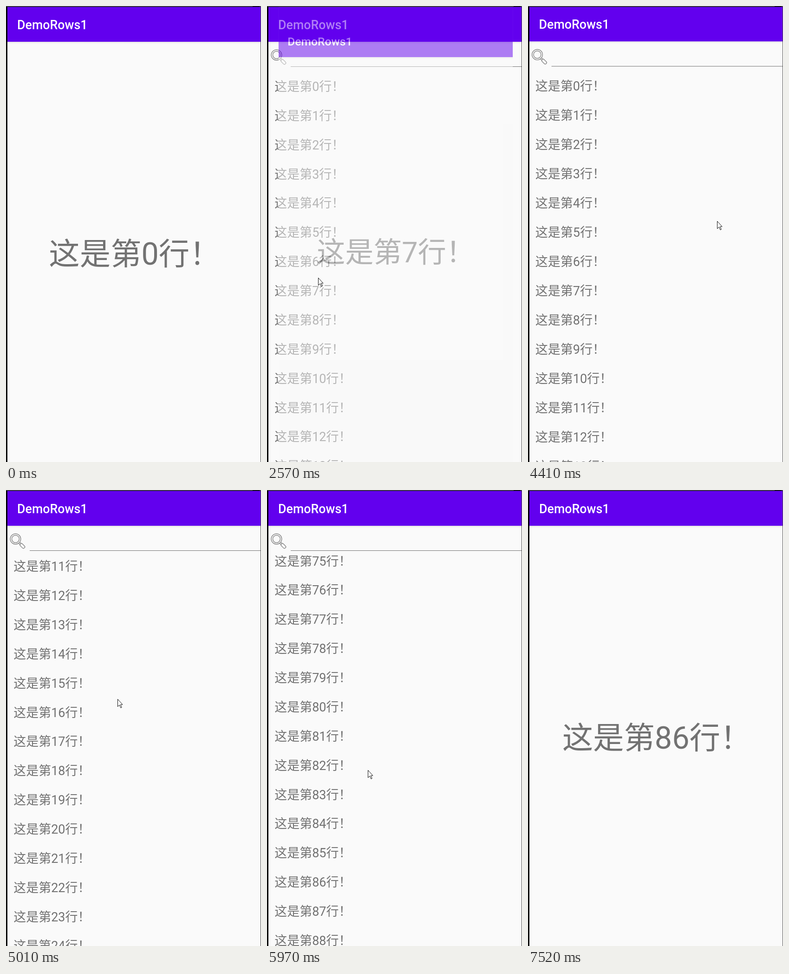
Write an HTML page that moves like this. It is 549 by 982 pixels and loops after 8000 ms.

```html
<!DOCTYPE html>
<html lang="zh-CN">
<head>
<meta charset="utf-8">
<title>List and detail</title>
<style>
  html, body { margin: 0; width: 100%; height: 100%; overflow: hidden; background: #000; }
  svg { display: block; width: 549px; height: 982px; }
  text { font-family: Roboto, "Noto Sans CJK SC", "Noto Sans CJK", sans-serif; fill: #727272; }
  .row { font-size: 27px; }
  .big { font-size: 66.4px; text-anchor: middle; }
  .title { font-size: 26.8px; font-weight: 500; fill: #fff; }
  .icon { fill: none; stroke: #858585; stroke-width: 1.4; }
</style>
</head>
<body>
<svg viewBox="0 0 549 982">
  <defs>
    <clipPath id="screen"><rect x="3" y="2" width="545" height="980"/></clipPath>
    <clipPath id="listBox"><rect x="3" y="141" width="560" height="870"/></clipPath>
    <linearGradient id="shade" x2="0" y2="1">
      <stop stop-color="#000" stop-opacity=".1"/>
      <stop offset="1" stop-color="#000" stop-opacity="0"/>
    </linearGradient>
    <g id="page">
      <rect x="3" y="-40" width="548" height="1070" fill="#fafafa"/>
      <rect x="3" y="77" width="548" height="4" fill="url(#shade)"/>
      <rect x="3" y="-40" width="548" height="117" fill="#6200ee"/>
      <text class="title" x="24" y="50">DemoRows1</text>
    </g>
  </defs>

  <g clip-path="url(#screen)">
    <g id="list">
      <use href="#page"/>
      <g class="icon" transform="translate(20.5 105.5) rotate(45)">
        <circle r="11.3"/>
        <circle r="8"/>
        <path d="M11.3 -1.700h3.700M11.3 1.700h3.700"/>
        <rect x="15" y="-3" width="12" height="6" rx="2.600"/>
      </g>
      <rect x="51" y="130" width="500" height="1" fill="#727272"/>
      <g clip-path="url(#listBox)"><g id="rows"></g></g>
    </g>
    <g id="detail">
      <use href="#page"/>
      <text id="big" class="big" x="277" y="557"></text>
    </g>
  </g>

  <rect width="549" height="1" fill="#777"/>
  <rect x="531" width="15" height="1" fill="#222"/>
  <rect x="548" y="1" width="1" height="981" fill="#555"/>
  <path id="pointer" d="M.5 .5v16l3.700-3.500 2.800 6.200 2.200-1.100-2.700-6h4.500z" fill="#fff" stroke="#111"/>
</svg>

<script>
const LOOP = 8000, STEP = 120, PITCH = 62.87;
const $ = id => document.getElementById(id);
const label = n => `这是第${n}行！`;
const clamp = v => Math.max(0, Math.min(1, v));

// The picture advances in steps during these spans and rests in between.
const spans = [[870, 2190], [2570, 3050], [4050, 6090], [6430, 6670], [7040, 7520]];

// Page changes: those with a row open its detail, the others go back to the list.
const moves = [
  { at: -480, len: 480, row: 0 },
  { at: 870, len: 360 },
  { at: 2570, len: 480, row: 7 },
  { at: 4050, len: 530 },
  { at: 7040, len: 480, row: 86 }
];

// Pointer path: step count, x, y.
const path = [
  [1, 560, 310], [4, 327, 352], [7, 113, 392], [13, 110, 585], [17, 560, 470],
  [18, 560, 430], [21, 407, 463], [24, 240, 720], [26, 240, 450], [29, 249, 723],
  [32, 329, 400], [34, 217, 603], [35, 217, 603], [39, 111, 584], [43, 560, 470]
];

// Snaps a time to the last step shown and counts the steps so far.
function snap(time) {
  let t = 0, count = 0;
  for (const [from, to] of spans) {
    if (time < from) break;
    const n = Math.floor((Math.min(time, to) - from) / STEP);
    t = from + n * STEP;
    count += n + 1;
  }
  return { t, count };
}

function pointerAt(step) {
  const i = path.findIndex(p => p[0] >= step);
  if (i < 1) return path[0].slice(1);
  const [s0, x0, y0] = path[i - 1], [s1, x1, y1] = path[i];
  const f = (step - s0) / (s1 - s0);
  return [x0 + (x1 - x0) * f, y0 + (y1 - y0) * f].map(Math.round);
}

// A flick runs a distance and slows to a stop.
const flick = (t, start, dist) => dist * (1 - (1 - clamp((t - start) / 693)) ** 1.5);
const scrollAt = t => flick(t, 4800, 1675) + flick(t, 5400, 3308);

function zoom(el, s) {
  el.setAttribute("transform", `translate(277 490) scale(${s}) translate(-277 -490)`);
}

for (let n = 0; n < 100; n++) {
  const row = document.createElementNS("http://www.w3.org/2000/svg", "text");
  row.setAttribute("class", "row");
  row.setAttribute("x", 16.2);
  row.setAttribute("y", 183 + n * PITCH);
  row.textContent = label(n);
  $("rows").append(row);
}

function draw(time) {
  const { t, count } = snap(time);
  const past = moves.filter(m => m.at <= t);
  const move = past[past.length - 1];
  const opening = "row" in move;
  const age = t - move.at, rest = 1 - clamp(age / move.len);

  zoom($("list"), 1 + .018 * (opening ? 1 - rest : rest ** 2));
  zoom($("detail"), opening ? 1 - .08 * rest ** 3 : .97);
  $("detail").setAttribute("opacity", opening ? clamp(.5 + age / STEP) : clamp(.5 - age / STEP));
  $("big").textContent = label(past.filter(m => "row" in m).pop().row);
  $("rows").setAttribute("transform", `translate(0 ${-scrollAt(t)})`);
  $("pointer").setAttribute("transform", `translate(${pointerAt(count)})`);
}

const start = performance.now();
function tick() {
  draw((performance.now() - start) % LOOP);
  requestAnimationFrame(tick);
}
tick();
</script>
</body>
</html>
```
